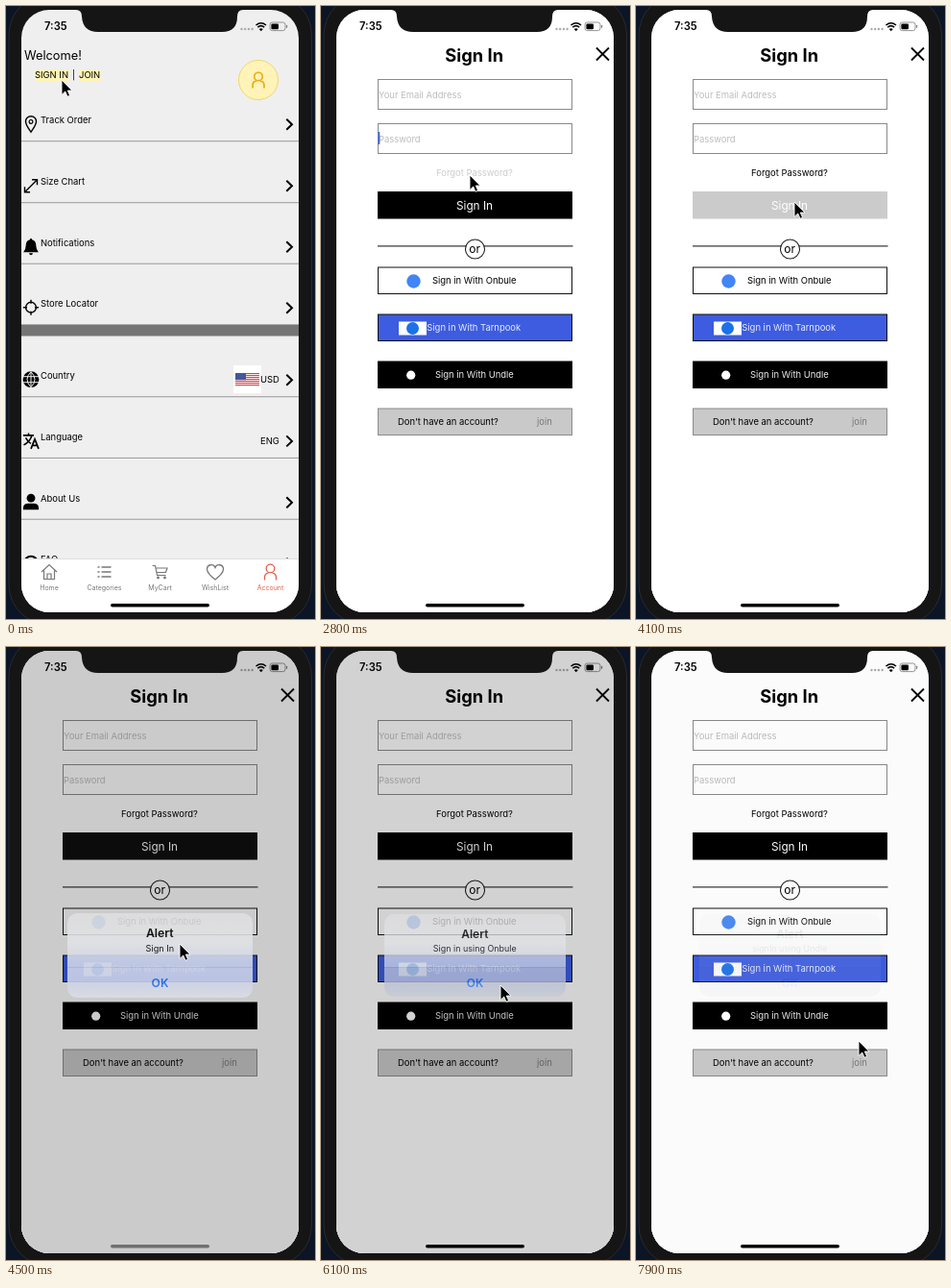
Animation of 322 by 638 pixels, one loop 8000 ms. Source, as an HTML page:

```html
<!DOCTYPE html>
<html lang="en">
<head>
<meta charset="utf-8">
<title>Sign in flow</title>
<style>
  html, body { margin: 0; height: 100%; overflow: hidden; background: #0b1526; }
  svg { display: block; width: 100vw; height: 100vh; }
  text { font-family: Inter, Roboto, sans-serif; font-size: 9.43px; white-space: pre; }
</style>
</head>
<body>
<svg id="stage" viewBox="0 0 322 638"></svg>
<script>
const LOOP = 8000, STEP = 100;
const PRESS_LEAD = 190, PRESS_HOLD = 170, RELEASE = 250, FADE_OUT = 280;
const SLIDE_START = 640;

const alerts = [
  { button: 'forgot', start: 2980, end: 3650, message: 'reset password' },
  { button: 'signIn', start: 4290, end: 5000, message: 'Sign In' },
  { button: 'first',  start: 5590, end: 6010, message: 'Sign in using Onbule' },
  { button: 'second', start: 6480, end: 6930, message: 'Sign in using Tarnpook' },
  { button: 'third',  start: 7320, end: 7670, message: 'signIn using Undle' },
];
const presses = [
  { id: 'enter', at: 380 },
  ...alerts.map(a => ({ id: a.button, at: a.start - PRESS_LEAD })),
];
// Pointer stops: time, x, y
const pointerPath = [
  [0, 58, 77], [450, 58, 77], [900, 131, 201], [1300, 160, 400], [1500, 165, 510],
  [1800, 150, 328], [1900, 150, 328], [2200, 110, 91], [2300, 110, 91],
  [2450, 115, 135], [2600, 155, 176], [3000, 155, 176], [3500, 185, 345],
  [3700, 185, 345], [4050, 165, 204], [4230, 165, 204], [4500, 181, 309],
  [4700, 178, 346], [5030, 178, 346], [5350, 175, 283], [5560, 175, 283],
  [5850, 187, 352], [6130, 187, 352], [6270, 182, 335], [6470, 182, 335],
  [6700, 182, 350], [6960, 182, 350], [7110, 178, 383], [7300, 178, 383],
  [7500, 175, 352], [7690, 175, 352], [7900, 232, 410], [8000, 232, 415],
];

const attrs = o => Object.entries(o).map(([k, v]) => `${k}="${v}"`).join(' ');
const text = (x, y, s, o = {}) => `<text x="${x}" y="${y}" ${attrs(o)}>${s}</text>`;
const mid = (x, y, s, o = {}) => text(x, y, s, { 'text-anchor': 'middle', ...o });
const rect = (x, y, width, height, fill, o = {}) =>
  `<rect ${attrs({ x, y, width, height, fill, ...o })}/>`;
const circle = (cx, cy, r, fill, o = {}) => `<circle ${attrs({ cx, cy, r, fill, ...o })}/>`;
const path = (d, o = {}) => `<path ${attrs({ d, ...o })}/>`;
const stroke = (d, color = '#000', width = 1.4, o = {}) =>
  path(d, { fill: 'none', stroke: color, 'stroke-width': width, ...o });
const group = (o, ...parts) => `<g ${attrs(o)}>${parts.join('')}</g>`;
const at = (x, y, ...parts) => group({ transform: `translate(${x} ${y})` }, ...parts);
const size = px => ({ style: `font-size:${px}px` });
const bold = (px, weight = 600) => ({ style: `font-size:${px}px;font-weight:${weight}` });

const personOutline = (color, width) =>
  circle(0, -3.6, 4.3, 'none', { stroke: color, 'stroke-width': width }) +
  stroke('M-6 8.5V6Q-6 1.5-2 1.2M6 8.5V6Q6 1.5 2 1.2', color, width);

const icons = {
  pin: stroke('M0 8.5C-3 4-5.5 1-5.5-2.5A5.5 5.5 0 0 1 5.5-2.5C5.5 1 3 4 0 8.5Z') +
    circle(0, -2.3, 1.9, 'none', { stroke: '#000', 'stroke-width': 1.2 }),
  resize: stroke('M-6 6.5L6-5.5M1-6H6.5V-.5M-6.5 1.5V7H-1'),
  bell: path('M-8 6Q-5.3 3-5.3-1Q-5.3-6-1.2-7Q-1-8.5 0-8.5T1.2-7Q5.3-6 5.3-1Q5.3 3 8 6ZM-2 7H2Q1.6 9 0 9T-2 7Z'),
  target: circle(0, 0, 5.4, 'none', { stroke: '#000', 'stroke-width': 1.4 }) +
    stroke('M0-8V-4M0 4V8M-8 0H-4M4 0H8'),
  globe: circle(0, 0, 8.4, '#000') +
    stroke('M-8-3H8M-8 3H8M0-8V8M0-8Q-8 0 0 8M0-8Q8 0 0 8', '#efefef', 1),
  translate: stroke('M-8-5.5H3M-2.5-8V-5.5M1-5.5Q-1 1-7.5 4.5M-5.5-3Q-3 1.5 0 3', '#000', 1.6) +
    stroke('M0 8.5L4-1.5L8 8.5M1.6 5H6.4', '#000', 1.7),
  person: circle(0, -4, 4.4, '#000') + path('M-8 8V6Q-8 1.5-3 1.5H3Q8 1.5 8 6V8Z'),
  help: circle(0, 0, 7, 'none', { stroke: '#000', 'stroke-width': 2 }),
};

const tabIcons = [
  ['Home', 45, stroke('M-8 0L0-7.5L8 0M-5.5-1.5V7.5H5.5V-1.5M-2 7V2H2V7', '#777', 1.2)],
  ['Categories', 102.5, stroke('M-3-5H7M-3 0H7M-3 5H7M-7-5H-5M-7 0H-5M-7 5H-5', '#777', 1.5)],
  ['MyCart', 160.5, stroke('M-8-6.5H-5L-3 3.5H6M-4.5-4H7.5L6 .5H-3.5', '#777', 1.2) +
    circle(-2, 6, 1.4, '#777') + circle(5, 6, 1.4, '#777')],
  ['WishList', 218, stroke('M0 8Q-8.5 1.5-8.5-3A4.4 4.4 0 0 1 0-4.5A4.4 4.4 0 0 1 8.5-3Q8.5 1.5 0 8Z', '#777', 1.3)],
  ['Account', 275.5, personOutline('#e2604c', 1.3)],
];

function flag() {
  const stripes = [0, 1, 2, 3, 4, 5, 6].map(i => rect(239, 382 + i * 2, 25, 1.1, '#d4444c'));
  return rect(237, 374, 29, 29, '#fff') + stripes.join('') + rect(239, 382, 11, 7.2, '#41589c');
}

function accountPage() {
  const rows = [
    ['Track Order', 'pin', 122], ['Size Chart', 'resize', 186],
    ['Notifications', 'bell', 249.5], ['Store Locator', 'target', 313],
    ['Country', 'globe', 388], ['Language', 'translate', 451.7],
    ['About Us', 'person', 515.5], ['FAQ', 'help', 579],
  ].map(([label, icon, y]) =>
    text(36, y, label) + at(26, y + .7, icons[icon]) +
    stroke(`M292.3 ${y - 4.3}L298 ${y + 1.2}L292.3 ${y + 6.7}`, '#000', 2) +
    rect(16, y + 18.2, 289, 1, '#999'));
  const tabs = tabIcons.map(([label, x, icon]) =>
    at(x, 589, icon) +
    mid(x, 608, label, { ...size(7), fill: label === 'Account' ? '#e2604c' : '#777' }));
  return [
    rect(16, 4, 289, 627, '#efefef'),
    text(19, 55.5, 'Welcome!', size(12.8)),
    group({ id: 'enter' }, rect(30, 66, 35.5, 12, '#fff4b3'), text(30, 75.3, 'SIGN IN')),
    text(69, 75, '|'),
    rect(76, 66, 22.5, 12, '#fff4b3'), text(76, 75.3, 'JOIN'),
    circle(263, 77, 20.5, '#fff3b8', { stroke: '#ecd96a' }),
    at(263, 77, personOutline('#f0ae1c', 1.8)),
    ...rows,
    rect(16, 332, 289, 11.5, '#757575'),
    flag(), text(265, 392.3, 'USD'), text(265, 456, 'ENG'),
    rect(16, 575, 289, 56, '#fff'), rect(16, 575, 289, .7, '#d0d0d0'),
    ...tabs,
  ].join('');
}

function signInPage() {
  const outline = (y, h, fill, color) =>
    rect(59.5, y + .5, 202, h, fill, { stroke: color });
  const field = (y, label) =>
    outline(y, 31, '#fff', '#8a8a8a') + text(60, y + 19.5, label, { fill: '#bcbcbc' });
  return [
    rect(16, 4, 289, 634, '#fff'),
    mid(159.7, 57.8, 'Sign In', bold(18.3, 700)),
    stroke('M287 43.5L300 56.5M300 43.5L287 56.5', '#000', 1.8),
    field(76, 'Your Email Address'), field(122, 'Password'),
    rect(59.5, 85.5, 1.8, 13, '#4468e0', { id: 'caret' }),
    group({ id: 'forgot' }, mid(160, 177, 'Forgot Password?')),
    group({ id: 'signIn' }, rect(59, 193, 203, 28.5, '#000'),
      mid(160, 212, 'Sign In', { ...size(11.8), fill: '#fff' })),
    rect(59, 249.3, 203.5, 1.2, '#333'),
    circle(160.5, 253, 10, '#fff', { stroke: '#222', 'stroke-width': 1.1 }),
    mid(160.2, 257, 'or', size(12)),
    group({ id: 'first' }, outline(271.5, 27.5, '#fff', '#111'),
      circle(96.5, 286.5, 7.2, '#4285f4'), text(116, 289.3, 'Sign in With Onbule')),
    group({ id: 'second' }, outline(320.5, 27.5, '#3d5cdf', '#111'),
      rect(81, 328.5, 29, 14, '#fff'), circle(95.5, 335.5, 6.5, '#1b72e8'),
      text(110.3, 338.4, 'Sign in With Tarnpook', { fill: '#e8ecfb' })),
    group({ id: 'third' }, rect(59, 369.5, 203, 28.5, '#000'),
      circle(93.7, 384.2, 4.6, '#fff'),
      text(119, 387.3, 'Sign in With Undle', { fill: '#eee' })),
    outline(418.5, 27.5, '#c9c9c9', '#8a8a8a'),
    text(80, 436, "Don't have an account?"),
    text(225, 436, 'join', { fill: '#777' }),
  ].join('');
}

function statusBar() {
  const dots = [0, 1, 2, 3].map(i => circle(245.5 + i * 3.7, 24, 1.2, '#aaa'));
  return [
    text(40, 25.3, '7:35', bold(11.2)), ...dots,
    stroke('M260.5 20Q265.8 15.5 271 20M262.3 22.2Q265.8 19.2 269.2 22.2', '#000', 1.6),
    path('M263.7 24L265.8 26.2L267.9 24Q265.8 22.3 263.7 24Z'),
    rect(275, 17, 16, 8.6, 'none', { rx: 2.4, stroke: '#888', 'stroke-width': .9 }),
    rect(276.4, 18.4, 7.6, 5.8, '#000', { rx: 1.2 }),
    rect(292, 19.7, 1.2, 3.2, '#888', { rx: .6 }),
  ].join('');
}

function alertBox() {
  return group({ id: 'alert' },
    group({ 'clip-path': 'url(#alertShape)' },
      rect(66, 278, 189, 86, 'url(#glass)'),
      rect(66, 333, 189, .7, '#b4bcd4'),
      rect(66, 333, 189, 31, '#3c466e', { id: 'okPressed', 'fill-opacity': .13 })),
    mid(160.3, 302.7, 'Alert', bold(12)),
    mid(160.3, 317, '', { ...size(8.95), id: 'message' }),
    mid(160.5, 353.7, 'OK', { ...bold(11.8), fill: '#1f6ff0' }));
}

const glassStops = [[0, '#dfdfe0'], [.35, '#e2e3e6'], [.6, '#cfd6ea'], [.8, '#ccd3e9'], [1, '#dbdde4']]
  .map(([offset, color]) => `<stop offset="${offset}" stop-color="${color}"/>`).join('');

document.getElementById('stage').innerHTML = [
  `<defs>
    <clipPath id="screen"><rect x="16" y="4" width="289" height="627" rx="29"/></clipPath>
    <clipPath id="alertShape"><rect x="66" y="278" width="189" height="86" rx="10"/></clipPath>
    <linearGradient id="glass" x2="0" y2="1">${glassStops}</linearGradient>
  </defs>`,
  rect(0, 0, 322, 638, '#0b1526'),
  rect(3, -12, 315.5, 656, '#151515', { rx: 42, stroke: '#2a2a2c' }),
  group({ 'clip-path': 'url(#screen)' },
    accountPage(),
    group({ id: 'modal' }, signInPage()),
    statusBar(),
    rect(16, 4, 289, 627, '#000', { id: 'dim' }),
    rect(109, 622, 103, 3.6, '#000', { id: 'homeBar', rx: 1.8 }),
    alertBox()),
  path('M73 0V4Q79 4 79 11Q80 27 96 27H225Q241 27 241 11Q241 4 247 4V0Z', { fill: '#151515' }),
  path('M0 0V15.5L3.7 12L6 17.3L8.6 16.2L6.3 11H11Z',
    { id: 'pointer', stroke: '#fff', 'stroke-width': .9 }),
].join('');

const el = id => document.getElementById(id);
const set = (id, name, value) => el(id).setAttribute(name, value);
const clamp = v => Math.max(0, Math.min(1, v));

// Critically damped approach from 0 to 1
function spring(ms) {
  const x = Math.max(0, ms) * .018;
  return 1 - (1 + x) * Math.exp(-x);
}
const fadeOut = ms => (1 + Math.cos(Math.PI * clamp(ms / FADE_OUT))) / 2;

function pointerAt(t) {
  const i = pointerPath.findIndex(stop => stop[0] > t);
  const [t0, x0, y0] = pointerPath[i - 1], [t1, x1, y1] = pointerPath[i];
  const p = (t - t0) / (t1 - t0), e = p * p * (3 - 2 * p);
  return [x0 + (x1 - x0) * e, y0 + (y1 - y0) * e];
}

function render(t) {
  set('modal', 'transform', `translate(0 ${634 * (1 - spring(t - SLIDE_START))})`);
  for (const { id, at } of presses) {
    const released = clamp((t - at - PRESS_HOLD) / RELEASE);
    set(id, 'opacity', t < at ? 1 : .2 + .8 * released);
  }

  set('caret', 'visibility', t >= 2200 && t < 3000 ? 'visible' : 'hidden');
  set('caret', 'y', t < 2500 ? 85.5 : 131);

  const active = alerts.find(a => t >= a.start && t < a.end + FADE_OUT);
  const shown = active ? spring(t - active.start) : 0;
  const level = active ? shown * fadeOut(t - active.end) : 0;
  const scale = 1 + .2 * (1 - shown);
  const age = active ? t - active.start : 0;
  set('dim', 'opacity', .23 * level);
  set('alert', 'opacity', level);
  set('alert', 'transform', `translate(160.5 321) scale(${scale}) translate(-160.5 -321)`);
  set('okPressed', 'visibility', active && t >= active.end - 100 ? 'visible' : 'hidden');
  set('homeBar', 'fill', age > 100 && age < 350 ? '#707070' : '#000');
  el('message').textContent = active ? active.message : '';

  set('pointer', 'transform', `translate(${pointerAt(t)})`);
}

function tick() {
  const t = performance.now() % LOOP;
  render(Math.floor(t / STEP) * STEP);
  requestAnimationFrame(tick);
}
tick();
</script>
</body>
</html>
```
